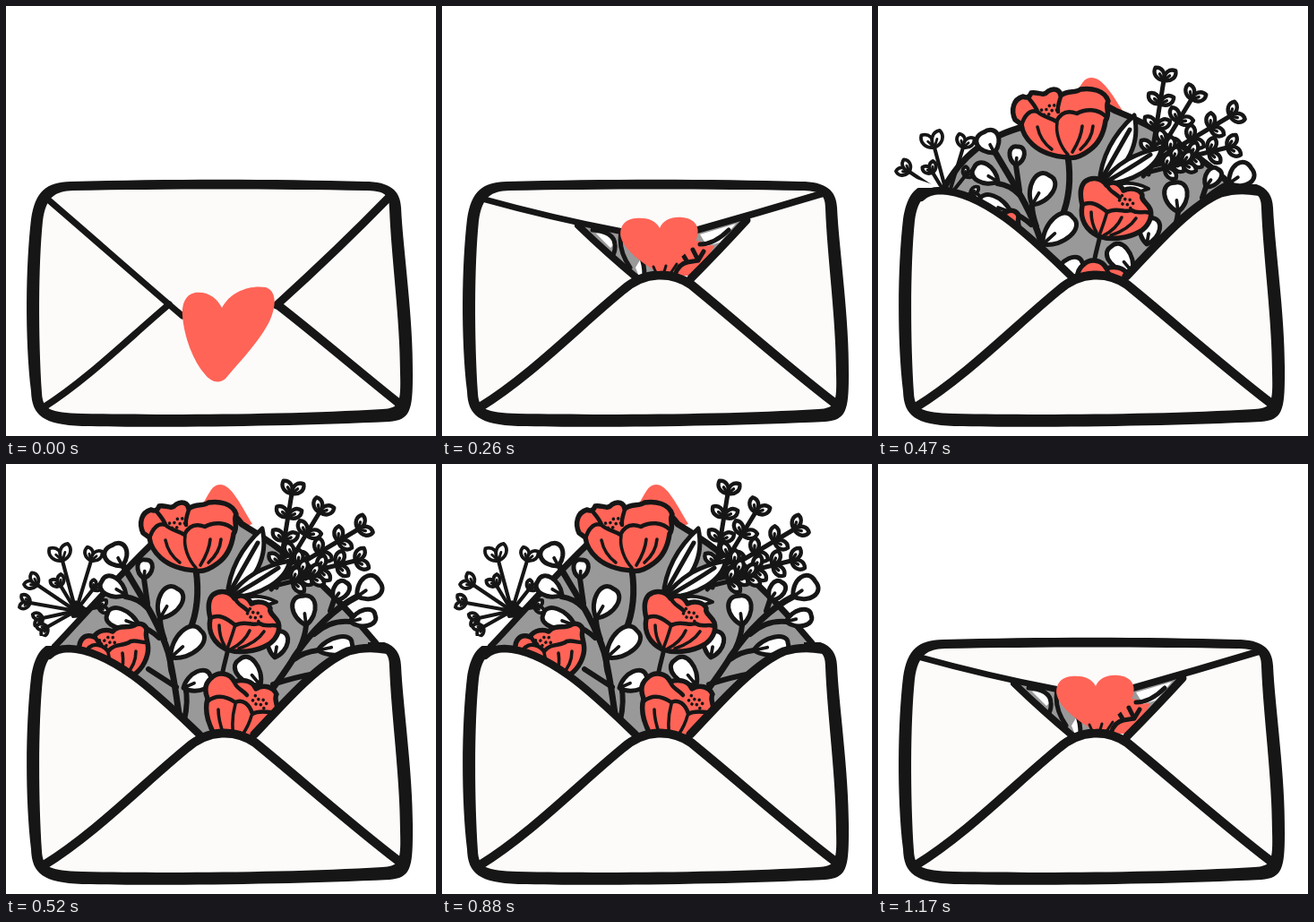
These frames come from a looping animation (480 by 480 pixels, 1.3 s). An HTML page with a canvas:

```html
<!DOCTYPE html>
<html lang="en">
<head>
<meta charset="utf-8">
<title>Envelope bouquet</title>
<style>
html, body { margin: 0; width: 100%; height: 100%; overflow: hidden; background: #fff; }
canvas { display: block; }
</style>
</head>
<body>
<canvas id="stage" width="480" height="480"></canvas>
<script>
const c = document.getElementById('stage').getContext('2d');
const INK = '#161616', RED = '#ff6457', GREY = '#999', PAPER = '#fcfbf9', WHITE = '#fff';
const LOOP = 1300;
c.lineCap = c.lineJoin = 'round';

function fill(d, color) {
  c.fillStyle = color;
  c.fill(new Path2D(d), 'evenodd');
}

function line(d, width, color = INK) {
  c.lineWidth = width;
  c.strokeStyle = color;
  c.stroke(new Path2D(d));
}

function shape(d, color, width) {
  fill(d, color);
  line(d, width);
}

// Leaf growing from its base; a larger tip value makes it rounder.
function leaf(x, y, deg, len, w, { tip = 0.8, width = 4, vein = 0.5 } = {}) {
  c.save();
  c.translate(x, y);
  c.rotate(deg * Math.PI / 180);
  shape(`M0 0C${len * 0.32} ${-w} ${len * tip} ${-w} ${len} 0C${len * tip} ${w} ${len * 0.32} ${w} 0 0Z`, WHITE, width);
  line(`M0 0L${len * vein} 0`, width * 0.75);
  c.restore();
}

const bud = (x, y, deg, len, w) => leaf(x, y, deg, len, w, { tip: 1.06, width: 5, vein: 0.4 });

function dots(x, y, deg) {
  c.save();
  c.translate(x, y);
  c.rotate(deg * Math.PI / 180);
  c.fillStyle = INK;
  for (let i = 0; i < 8; i++) {
    c.beginPath();
    c.arc((i % 4) * 5 - 8, (i >> 2) * 6 - 3 + (i % 2) * 2, 1.8, 0, 7);
    c.fill();
  }
  c.restore();
}

// Stem with leaf pairs along it and a pair at the end.
function sprig(x0, y0, x1, y1, pairs) {
  const deg = Math.atan2(y1 - y0, x1 - x0) * 180 / Math.PI;
  line(`M${x0} ${y0}L${x1} ${y1}`, 5);
  for (let i = 1; i <= pairs; i++) {
    const k = i / pairs, x = x0 + (x1 - x0) * k, y = y0 + (y1 - y0) * k;
    const spread = i === pairs ? 42 : 56;
    leaf(x, y, deg - spread, 17, 6.5, { width: 4.4 });
    leaf(x, y, deg + spread, 17, 6.5, { width: 4.4 });
  }
}

function ray(x, y, size) {
  const ox = 78, oy = 164, deg = Math.atan2(y - oy, x - ox) * 180 / Math.PI;
  line(`M${ox} ${oy}L${x} ${y}`, 4.2);
  leaf(x, y, deg - 32, size, size * 0.38, { width: 3.8 });
  leaf(x, y, deg + 32, size, size * 0.38, { width: 3.8 });
}

function spray() {
  [[63, 108, 20], [95, 108, 16], [35, 135, 15], [61, 136, 13], [27, 155, 13],
   [41, 172, 12], [46, 182, 12], [97, 140, 11], [103, 160, 12]].forEach(r => ray(...r));
  fill('M68 162L78 152L90 161L87 171L74 172Z', INK);
}

function branches() {
  line('M130 112C146 140 170 175 181 210C188 238 190 260 195 292', 7);
  line('M133 148Q148 150 158 161M154 128Q156 142 158 156M172 172Q172 182 177 196', 6);
  line('M184 217Q182 226 186 236M148 180Q160 184 171 194M159 229L190 249M200 248Q204 264 199 286', 6);
  line('M212 118C216 145 213 167 205 186', 7);
  line('M248 206C245 220 242 228 241 238', 5);
  line('M392 148C368 160 342 185 322 215C310 236 296 250 282 276', 7);
  line('M335 180Q334 192 328 205M366 152L362 164M384 176Q362 174 344 190M348 208Q332 210 322 218M345 234Q322 238 298 246', 6);
  [[130, 114, -118, 26, 17], [134, 146, -150, 31, 14], [154, 128, -85, 21, 11],
   [172, 172, -60, 38, 17], [184, 216, -42, 45, 18], [148, 180, -160, 37, 14], [198, 250, -24, 33, 14],
   [335, 180, -97, 33, 17], [392, 148, -35, 30, 17], [366, 152, -55, 24, 11], [384, 176, -14, 29, 12],
   [348, 208, -12, 39, 13], [300, 216, -80, 30, 15], [284, 247, -130, 37, 16]
  ].forEach(b => bud(...b));
}

function greens() {
  sprig(296, 140, 312, 122, 1);
  sprig(302, 138, 319, 33, 4);
  sprig(305, 128, 350, 54, 3);
  sprig(304, 126, 393, 73, 4);
  sprig(308, 128, 390, 108, 4);
  sprig(300, 136, 340, 126, 2);
  shape('M247 148C249 120 262 94 286 72C293 102 280 132 247 148Z', WHITE, 5);
  line('M248 146Q264 118 281 88', 5);
  shape('M248 150C266 124 290 113 317 108C312 130 286 147 248 150Z', WHITE, 5);
  line('M250 149Q280 132 304 116', 5);
  shape('M262 150Q284 144 302 154Q284 162 262 150Z', WHITE, 4);
}

function flowers() {
  shape('M153 77C148 66 151 54 162 51C166 53 169 52 171 47C178 45 184 52 190 45C196 41 203 43 204 50C212 43 220 48 226 43C238 41 253 44 257 56C253 63 260 70 254 78C252 92 246 104 236 111C228 117 220 121 212 119C196 118 182 113 173 105C165 98 161 90 160 82Z', RED, 5.5);
  line('M160 84C163 72 170 65 178 68C184 74 192 74 199 79C204 69 212 66 222 70C232 64 246 65 254 73M169 54C174 60 177 64 178 68M204 51C202 58 200 62 201 68', 4.5);
  line('M200 80C198 92 203 106 212 116M178 85C180 95 186 104 194 110M228 84C227 96 222 105 217 113M240 84C239 96 233 104 226 110', 3.6);
  dots(191, 65, -28);

  shape('M231 146C239 140 250 142 255 150C262 144 270 148 274 156C281 152 292 154 295 161C293 167 301 170 304 177C307 186 301 197 292 202C280 209 260 212 246 207C232 200 225 188 228 172C225 160 226 151 231 146Z', RED, 5.5);
  line('M228 172C238 167 246 172 256 180C266 174 275 181 283 178C291 183 297 178 303 181M256 150C257 156 264 158 270 164', 4.5);
  line('M256 179C253 190 250 198 247 206M238 180C238 188 240 196 244 203M272 186C268 195 260 202 252 206M288 187C282 196 272 202 260 206', 3.6);
  dots(278, 168, 28);

  shape('M82 207C81 196 88 189 98 193C103 185 113 184 119 187C126 178 138 185 145 179C151 177 157 180 157 186C154 193 161 200 158 212C155 225 146 235 135 240L96 230Z', RED, 5.5);
  line('M88 212C94 198 106 200 114 209C122 199 132 204 139 198C146 196 152 200 157 199M99 193Q102 198 106 201', 4.5);
  line('M114 210Q115 222 125 234M130 211Q132 224 128 234M145 209Q145 224 134 235', 3.6);
  dots(113, 197, -20);

  shape('M229 239C237 231 250 233 255 243C263 240 275 241 279 251C287 246 298 248 302 257C298 264 306 270 301 278L280 312L238 310C226 294 221 276 225 262C221 252 223 244 229 239Z', RED, 5.5);
  line('M225 265C236 256 247 260 256 266C264 262 272 268 275 279C284 274 292 278 300 277M255 243C256 250 264 252 269 258', 4.5);
  line('M256 268Q251 286 254 304M237 274Q237 286 243 302M274 281Q271 292 264 302', 3.6);
  dots(284, 265, 28);
}

function bouquet(dy) {
  c.save();
  c.clip(new Path2D('M0 0H480V204H400L277 306H216L75 204L40 192H0Z'));
  c.translate(0, dy);
  spray();
  branches();
  greens();
  flowers();
  c.restore();
}

const OUTER = 'M72 196C180 193 300 193 400 196C429 196 440 206 441 225C443 270 455 350 454 412C454 452 451 462 428 464C320 469 180 471 85 469C42 467 29 458 28 430C21 370 22 290 28 238C33 206 45 197 72 196Z';
const INNER = 'M75 206C180 204 300 204 400 206C422 206 428 210 428 226C430 280 440 350 440 410C441 444 439 449 420 450C320 456 180 457 85 455C48 454 41 450 40 432C36 370 36 290 41 240C45 212 55 207 75 206Z';
const POCKET = 'M42 448C100 412 152 358 202 317C226 296 256 296 278 311C326 350 382 400 438 443';

function taperedFolds() {
  line('M42 448C92 416 138 370 182 333', 7.5);
  line('M305 335C350 370 394 408 438 443', 9.5);
}

function heart(open) {
  fill(open
    ? 'M243 248C238 238 227 236 216 237C203 238 197 248 200 259C204 272 220 284 234 293Q241 299 249 293C264 282 281 272 285 257C288 245 281 237 268 236C256 235 247 239 243 248Z'
    : 'M241 337C236 326 225 318 211 320C200 322 196 333 197 346C199 370 209 396 222 411C229 420 238 422 245 416C262 396 285 372 295 350C302 334 302 318 290 314C272 311 250 319 241 337Z', RED);
}

function closed() {
  fill(OUTER, INK);
  fill(INNER, PAPER);
  taperedFolds();
  line('M48 217C98 260 150 306 197 346', 7);
  line('M428 213C388 254 344 296 302 334', 9);
  heart(false);
}

function ajar() {
  fill(OUTER, INK);
  fill(INNER, PAPER);
  c.save();
  c.clip(new Path2D('M150 243L200 252H285L342 238L277 301H216Z'));
  fill('M140 230H350V310H140Z', GREY);
  fill('M236 310V270L285 262L304 268L278 310Z', RED);
  fill('M172 254Q188 250 194 264L188 270Z', WHITE);
  fill('M216 292L222 282L230 302H220Z', WHITE);
  fill('M288 255L328 243L310 264L296 268Z', WHITE);
  line('M168 250Q192 252 193 266Q194 276 188 282M200 252Q196 272 210 292M222 280Q226 288 226 302', 5);
  line('M288 266Q304 266 320 250M260 300Q264 288 274 286L268 276M274 286L286 284L280 272M286 284L292 274', 5);
  c.restore();
  line('M152 245Q184 276 219 305', 8);
  line('M340 239Q308 274 278 304', 9);
  line('M48 216Q120 236 202 252', 7);
  line('M426 209Q356 230 285 250', 8);
  line(POCKET, 10);
  heart(true);
  line('M236 291L240 300M250 290L247 300M262 288L254 300', 3);
}

function front() {
  fill('M42 440L38 330L42 240Q46 207 70 206C122 208 178 266 218 304H277C304 274 346 224 382 208Q405 203 428 207L440 380L438 452L240 460L50 456Z', PAPER);
  c.save();
  c.clip(new Path2D('M0 203H64V215H404V199H480V480H0Z'));
  fill(`${OUTER}${INNER}`, INK);
  c.restore();
  line('M48 214Q56 206 70 206C122 208 178 266 217 303', 8.5);
  line('M277 302C304 274 346 224 382 209Q402 203 424 207', 9.5);
  line(POCKET, 10);
}

function half() {
  fill('M217 103C226 92 228 80 238 80C250 80 260 96 273 117L250 124Z', RED);
  shape('M72 206C94 166 120 146 165 134Q230 94 265 117C310 134 366 170 400 206L277 306H216Z', GREY, 7);
  bouquet(50);
  front();
}

function full() {
  fill('M213 52C226 40 227 23 239 23C251 23 260 42 275 67L250 76Z', RED);
  shape('M54 204C92 164 140 108 190 64Q238 32 263 67C302 90 352 126 413 200L277 306H216Z', GREY, 7);
  bouquet(0);
  front();
}

function poseAt(t) {
  if (t < 260) return closed;
  if (t < 390 || t >= 1170) return ajar;
  if (t < 520 || t >= 1040) return half;
  return full;
}

const start = performance.now();
let shown = null;
function frame() {
  const pose = poseAt((performance.now() - start) % LOOP);
  if (pose !== shown) {
    c.fillStyle = WHITE;
    c.fillRect(0, 0, 480, 480);
    pose();
    shown = pose;
  }
  requestAnimationFrame(frame);
}
frame();
</script>
</body>
</html>
```
